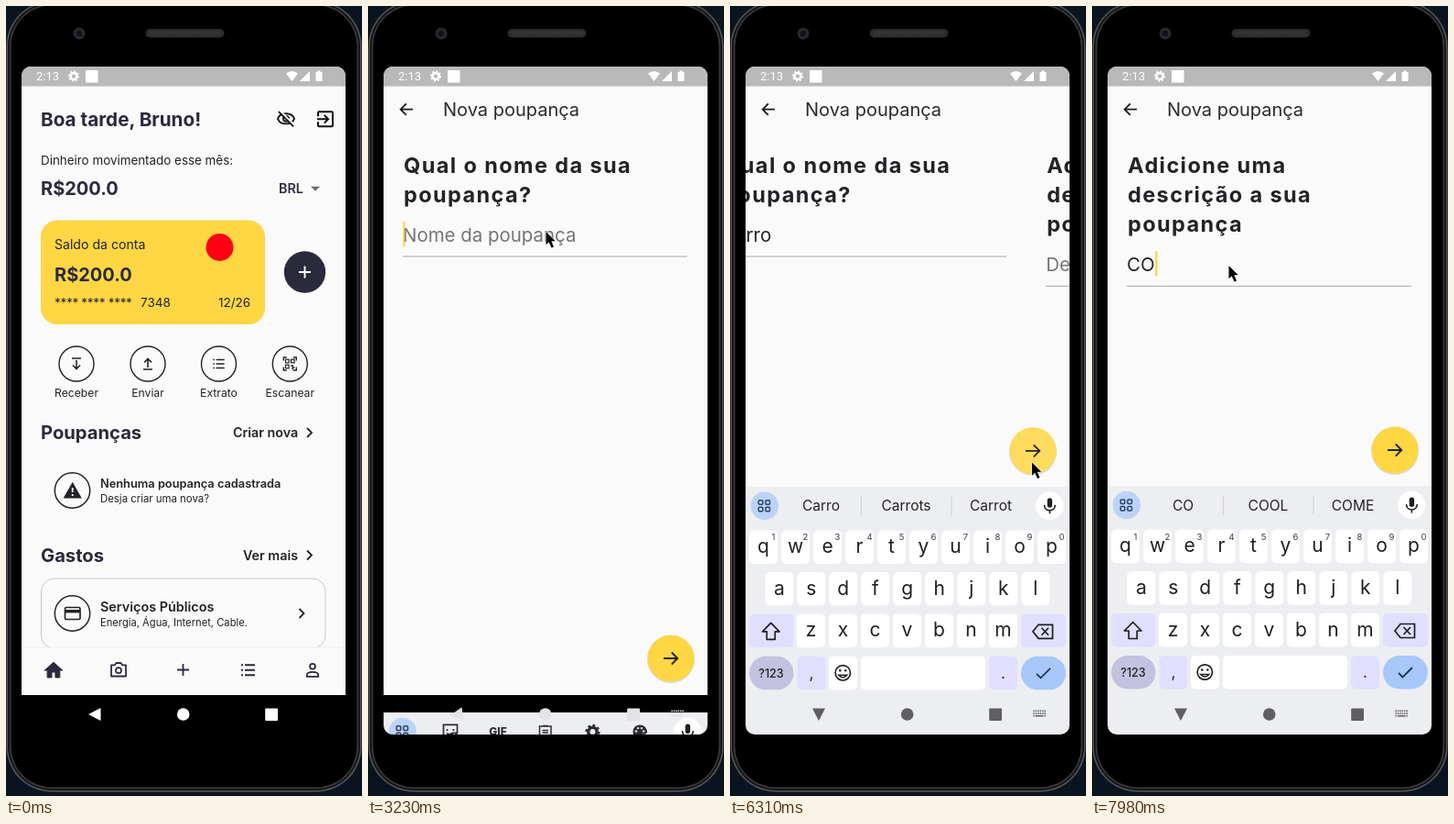
Recreate the animation shown at these times as an HTML page. Size 389 px wide and 861 px high, loop 8000 ms.

```html
<!DOCTYPE html>
<html lang="pt">
<head>
<meta charset="utf-8">
<title>Nova poupança</title>
<style>
html, body { margin: 0; width: 100%; height: 100%; overflow: hidden; background: #0a141f; }
svg { display: block; width: 100vw; height: 100vh; }
text { white-space: pre; }
</style>
</head>
<body>
<svg id="stage" viewBox="0 0 389 861" font-family="Inter, sans-serif"></svg>
<script>
const LOOP = 8000, INK = '#2a2a3c', DARK = '#222326', YELLOW = '#ffd644', PAPER = '#fafafa';
const WIDTH = 354, KB_TOP = 523, KB_HEIGHT = 271;

// ---- drawing helpers ----
const text = (x, y, s, size, weight = 400, fill = DARK, more = '') =>
  `<text x="${x}" y="${y}" font-size="${size}" font-weight="${weight}" fill="${fill}" ${more}>${s}</text>`;
const mid = (x, y, s, size, weight, fill, more = '') =>
  text(x, y, s, size, weight, fill, 'text-anchor="middle" ' + more);
const rect = (x, y, w, h, fill, r = 0, more = '') =>
  `<rect x="${x}" y="${y}" width="${w}" height="${h}" rx="${r}" fill="${fill}" ${more}/>`;
const disc = (x, y, r, fill, more = '') => `<circle cx="${x}" cy="${y}" r="${r}" fill="${fill}" ${more}/>`;
const ring = (x, y, r, color, w) => disc(x, y, r, 'none', `stroke="${color}" stroke-width="${w}"`);
const line = (d, color = DARK, w = 1.8, more = '') =>
  `<path d="${d}" fill="none" stroke="${color}" stroke-width="${w}" ${more}/>`;
const fill = (d, color = DARK) => `<path d="${d}" fill="${color}"/>`;
const at = (x, y, body, scale = 1) => `<g transform="translate(${x} ${y}) scale(${scale})">${body}</g>`;
const group = (id, body, more = '') => `<g id="${id}" ${more}>${body}</g>`;

const gear = (x, y, r, color) =>
  ring(x, y, r * .58, color, r * .42) +
  disc(x, y, r * .86, 'none', `stroke="${color}" stroke-width="${r * .3}" pathLength="16" stroke-dasharray="1 1"`);
const chevron = (x, y) => line(`M${x - 2} ${y - 5}l5 5-5 5`, DARK, 1.8);
const list = (x, y, s, color) => at(x, y,
  line('M-7.5-5.5h2M-7.5 0h2M-7.5 5.5h2M-3.5-5.5h11M-3.5 0h11M-3.5 5.5h11', color, 1.9), s);

// ---- device ----
function device() {
  const shell = (inset, color) =>
    rect(inset, inset - 6, 389 - 2 * inset, 863 - 2 * inset, color, 50 - inset);
  return rect(0, 0, 389, 861, '#0a141f') +
    shell(.5, '#56565a') + shell(2, '#161618') + shell(4, '#3b3b3e') + shell(5.5, '#000') +
    disc(80, 30, 6.5, '#29292d') + disc(80, 30, 3.2, '#10131c') +
    rect(152.5, 25, 86, 9.5, '#2b2b2d', 4.7) +
    line('M157 29.7H234', '#3c3c3f', 5, 'stroke-dasharray="1 1"');
}

function statusBar() {
  return rect(17, 66, WIDTH, 21.5, '#b9b9b9') +
    text(33, 81.3, '2:13', 13, 400, '#fff', 'font-family="Roboto, sans-serif"') +
    gear(74, 76.5, 6, '#fff') + rect(87, 70, 13.5, 13.5, '#fff') +
    fill('M306 73.6Q312.5 68.4 319 73.6L312.5 82Z', '#fff') +
    fill('M332 71V82H321Z', '#fff') +
    fill('M338.5 72h2v-1.5h3V72h2V82h-7Z', '#fff');
}

// ---- home ----
function homePage() {
  const action = (x, label, icon) =>
    ring(x, 390, 19, DARK, 1.4) + at(x, 390, icon) + mid(x, 425.5, label, 12.2);
  const corner = [0, 90, 180, 270].map(a =>
    `<g transform="rotate(${a})">${line('M-7-3.5V-7H-3.5', DARK, 1.4)}</g>`).join('');
  const scan = corner + [[-3, -3], [3, -3], [-3, 3]].map(([x, y]) =>
    rect(x - 1.8, y - 1.8, 3.6, 3.6, 'none', 0, `stroke="${DARK}" stroke-width="1.2"`)).join('') +
    line('M1 2h2v2h2M2 5.5h1.5', DARK, 1.3);
  const eye = line('M2 11.5C5 3.2 19 3.2 22 11.5C19 19.8 5 19.8 2 11.5Z', '#111', 2) +
    ring(12, 11.5, 3.4, '#111', 2) + line('M4.4 1.6L22.4 19.6', PAPER, 2.4) + line('M3 3L21 21', '#111', 2);
  return at(295.2, 112.5, eye, .9) +
    text(38, 173, 'Dinheiro movimentado esse mês:', 13.4) +
    text(38, 206, 'R$200.0', 20, 700, INK) + text(298, 204, 'BRL', 14.3, 600, INK) +
    fill('M333 196.7H343L338 201.8Z', '#6d6d70') +
    rect(38, 233.5, 245, 113.5, YELLOW, 18) +
    text(53, 265, 'Saldo da conta', 14.1) + text(53, 300, 'R$200.0', 20, 700, INK) +
    text(53, 328, '**** **** ****', 13.5, 400, DARK, 'letter-spacing="-.3"') +
    text(147, 328, '7348', 13.5) + text(232, 328, '12/26', 13.5) +
    disc(233.5, 263, 15, '#ff0015') +
    disc(326.5, 290, 22.7, INK) + line('M320 290h13M326.5 283.5v13', '#fff', 1.9) +
    action(77, 'Receber', line('M-5-6H5M0-4V5M-4 1.5L0 5.5L4 1.5', DARK, 1.6)) +
    action(155, 'Enviar', line('M-5 6H5M0 4V-5M-4-1.5L0-5.5L4-1.5', DARK, 1.6)) +
    action(232.5, 'Extrato', list(0, 0, .82, DARK)) +
    action(310.3, 'Escanear', scan) +
    text(38, 472, 'Poupanças', 20.2, 700, INK) + text(248, 470, 'Criar nova', 14.3, 600) + chevron(331, 465) +
    ring(72.5, 528, 19.2, DARK, 1.5) + fill('M72.7 518.8L82.8 536.5H62.6Z') +
    line('M72.7 525v5M72.7 532v2', PAPER, 1.8) +
    text(103, 525, 'Nenhuma poupança cadastrada', 12.8, 600) +
    text(103, 540.5, 'Desja criar uma nova?', 11.4) +
    text(38, 606, 'Gastos', 20.2, 700, INK) + text(259, 603.5, 'Ver mais', 14.3, 600) + chevron(331, 598.5) +
    rect(38.5, 624, 310.5, 76, 'none', 14, 'stroke="#c8c8ca"') +
    ring(72.5, 662, 19.2, DARK, 1.5) +
    rect(64.5, 655.5, 16.5, 13, 'none', 1.5, `stroke="${DARK}" stroke-width="1.7"`) +
    rect(64.5, 658, 16.5, 3.4, DARK) +
    text(103, 659.5, 'Serviços Públicos', 14.4, 600) +
    text(103, 675.5, 'Energia, Água, Internet, Cable.', 11.2) + chevron(322.5, 662);
}

// ---- add menu ----
function addPage() {
  const card = (y, title, a, b, icon) => rect(31, y, 326, 89.5, '#f1f2f4', 2) +
    text(120, y + 36.5, title, 19.4, 700) + text(120, y + 54, a, 11.3) + text(120, y + 69.5, b, 11.3) + icon;
  return card(159.7, 'Nova poupança', 'Crie uma nova poupança, guarda o seu', 'dinheiro e ainda ganha dinheiro.',
      line('M63.5 193V216H89M67 212L74.5 204L79.5 209L88.5 199', DARK, 2.3)) +
    card(264.2, 'Adicionar gasto', 'Tenho controle dos seus gastos através da', 'sua conta digital.',
      line('M62 321H89M65.2 297h7.6v18.5h-7.6ZM78.2 303.5h7.6v12h-7.6Z', DARK, 2.3));
}

function tabBar() {
  const lines = 'stroke-linejoin="round"';
  return rect(17, 699, WIDTH, 52, PAPER) + rect(17, 698.6, WIDTH, 1, '#efeff0') +
    group('ripple', disc(193.5, 724, 31, '#000'), 'clip-path="url(#tabs)"') +
    group('homeOn', at(40.2, 712.3, `<path d="M10 20v-6h4v6h5v-8h3L12 3 2 12h3v8z" fill="${INK}" stroke="${INK}" ${lines}/>`, .98)) +
    group('homeOff', line('M43.5 724.3L52 716.5L60.5 724.3M46 722.5V732H58V722.5M50 732v-5.5h4v5.5', INK, 1.7, lines)) +
    line('M115 718.3h3.8l1.8-2.3h4.8l1.8 2.3h3.8v12.2h-16Z', INK, 1.8, lines) + ring(123, 724.2, 3, INK, 1.7) +
    line('M187 723.5h13M193.5 717v13', INK, 1.8) + list(264.5, 723.8, 1, INK) +
    ring(335, 719.8, 2.9, INK, 1.8) + line('M328.8 730.8v-1.6c0-4.4 12.4-4.4 12.4 0v1.6Z', INK, 1.8);
}

// ---- new savings form ----
function formPage() {
  const title = lines => lines.map((s, i) =>
    text(39, 181.5 + i * 32.4, s, 23.5, 700, DARK, 'letter-spacing="1.4"')).join('');
  const field = (id, y, hint) => text(38, y, hint, 20.45, 400, '#757575', `id="${id}Hint"`) +
    text(38, y, '', 20.45, 400, DARK, `id="${id}Value"`) +
    rect(0, y - 21.5, 2, 27, '#ffcf40', 0, `id="${id}Caret"`) + rect(38, y + 16, 311, 1, '#a9a9ab');
  return rect(17, 87.5, WIDTH, 664, PAPER) +
    line('M49 112.7H36M41.8 106.5L35.6 112.7L41.8 118.9', '#1c1c1e', 1.8) +
    text(82, 120, 'Nova poupança', 20, 400, '#2b2b2d') +
    group('stepA', title(['Qual o nome da sua', 'poupança?']) + field('name', 256.5, 'Nome da poupança')) +
    group('stepB', title(['Adicione uma', 'descrição a sua', 'poupança']) + field('about', 288.8, 'Descrição da poupança')) +
    group('fab', disc(331, 1, 26, '#000', 'opacity=".13"') + disc(331, 0, 25.5, YELLOW) +
      '<circle id="fabWave" cx="331" cy="0" fill="#fff" opacity=".3"/>' +
      line('M323 0H338M331.8-6.5L338.3 0L331.8 6.5', DARK, 1.8));
}

// ---- keyboard ----
function keyboard() {
  const key = (x, y, w, color = '#fff', r = 5) => rect(x, y, w, 36.5, color, r);
  const row = (letters, x0, y) => [...letters].map((c, i) => {
    const x = x0 + i * 35;
    return key(x - 15.5, y, 31) + mid(x, y + 24.5, c, 21, 400, '#1f1f22', 'class="letter"');
  }).join('');
  const digits = [...'1234567890'].map((d, i) => mid(47.5 + i * 35, 581.5, d, 9.5, 400, '#3c3c40')).join('');
  const ink = '#2c2c30';
  const tools = line('M82.5 536.5h15v9l-5 5h-10ZM97.5 545.5h-5v5M86.5 541v2M93.5 541v2M86 545.5q3 2.5 6 0', ink, 1.7) +
    mid(142, 548, 'GIF', 12, 800, ink) +
    line('M187.5 538h12.5v13h-12.5ZM191 537.6h5.6M190.5 542.5h6.5M190.5 545.2h6.5M190.5 548h4.5', ink, 1.5) +
    gear(245.5, 544, 8, ink) +
    fill('M297 536.5a7.5 7.5 0 1 0 0 15c2 0 2-1.5 1.4-2.4c-.6-1.4.3-2.3 1.6-2.3h2c6 0 2.5-10.3-5-10.3Z', ink) +
    [[293, 543.5], [295, 540.2], [299, 540.2], [301.2, 543.5]].map(([x, y]) => disc(x, y, 1.2, '#edeef1')).join('');
  const words = [99.5, 192.5, 285].map(x => mid(x, 549.5, '', 15.5, 400, '#232326', 'class="word"')).join('') +
    rect(143, 533.5, 1, 21, '#cfcfd4') + rect(241.5, 533.5, 1, 21, '#cfcfd4');
  const grid = [[32, 538.5], [39.7, 538.5], [32, 546], [39.7, 546]].map(([x, y]) =>
    rect(x - .8, y - .6, 4.6, 4.6, 'none', 1, 'stroke="#2b4468" stroke-width="1.5"')).join('');
  return rect(17, KB_TOP, WIDTH, KB_HEIGHT, '#edeef1') +
    disc(37.8, 544, 15.2, '#bcd3f8') + grid +
    group('tools', tools) + group('words', words) +
    disc(349.3, 544, 15.2, '#fff') + rect(346.7, 535.5, 5.4, 10.5, '#1f1f22', 2.7) +
    line('M343.5 543c0 8 11.8 8 11.8 0M349.4 549v3.5', '#1f1f22', 1.6) +
    row('qwertyuiop', 36.5, 570.8) + digits + row('asdfghjkl', 53.8, 616.3) +
    key(21, 662, 48.5, '#e0dfff') +
    `<path id="shift" d="M44.7 671.5L54 681h-4.8v8.5h-9V681h-4.8Z" stroke="#1f1f22" stroke-width="1.7" stroke-linejoin="round"/>` +
    row('zxcvbnm', 88.5, 662) +
    key(318, 662, 49, '#e0dfff') +
    line('M331 681l6-7.5h15.5v15h-15.500ZM340.500 677l7.500 8M348 677l-7.500 8', '#1f1f22', 1.7) +
    key(21, 708, 48.5, '#c3c2e0', 18.2) + mid(45, 731, '?123', 12.5, 500, '#1f1f22') +
    key(73.5, 708, 31, '#e0dfff') + mid(89, 732, ',', 17) +
    key(108, 708, 31) + ring(123.3, 726, 8.2, '#1f1f22', 1.7) + line('M118.800 728.500q4.500 5 9 0Z', '#1f1f22', 1.600) +
    disc(120.3, 723.5, 1.3, '#1f1f22') + disc(126.3, 723.5, 1.3, '#1f1f22') +
    key(143, 708, 136) + key(283, 708, 31, '#e0dfff') + mid(298.5, 732, '.', 17) +
    key(318, 708, 49, '#a8c7fa', 18.2) + line('M335 727l4.500 4.500L350 721', '#1d3557', 1.800);
}

function navIcons() {
  let dots = '';
  for (let r = 0; r < 3; r++) for (let c = 0; c < 6; c++)
    if (r < 2 || c < 1 || c > 4) dots += rect(331.4 + c * 2.4, 767.5 + r * 2.7, 1.5, 1.6, 'inherit');
  dots = dots.replace(/fill="inherit"/g, '') + '<rect x="333.8" y="772.9" width="8.700" height="1.600"/>';
  return group('nav', `<path id="back" d="M-7 0L6.500-7V7Z"/>
    <circle cx="193.700" cy="772" r="6.800"/><rect x="283.200" y="765.500" width="13.800" height="13.500" rx="1"/>` +
    group('imeIcon', dots));
}

const pointer = '<path d="M0 0V14.200L3.200 11.200L6 17.500L8.500 16.400L5.800 10.200H10.200Z" fill="#000" stroke="#fff" stroke-width="1" paint-order="stroke"/>';

document.getElementById('stage').innerHTML =
  `<defs><clipPath id="screen"><rect x="17" y="66" width="${WIDTH}" height="728" rx="10"/></clipPath>
   <clipPath id="tabs"><rect x="17" y="699" width="${WIDTH}" height="52"/></clipPath></defs>` + device() +
  `<g clip-path="url(#screen)">` +
    rect(17, 66, WIDTH, 685, PAPER) +
    text(38, 131, 'Boa tarde, Bruno!', 20.7, 700, INK) +
    at(337, 111.3, fill('M10.090 15.590L11.500 17l5-5-5-5-1.410 1.410L12.670 11H3v2h9.670zM19 3H5a2 2 0 0 0-2 2v4h2V5h14v14H5v-4H3v4a2 2 0 0 0 2 2h14a2 2 0 0 0 2-2V5a2 2 0 0 0-2-2z', '#111')) +
    group('home', homePage()) + group('add', addPage()) + tabBar() +
    group('form', formPage()) + statusBar() +
    rect(17, 751, WIDTH, 43, '#000') +
    group('keyboard', keyboard()) + navIcons() +
  '</g>' + group('pointer', pointer);

// ---- timing ----
const el = {};
document.querySelectorAll('[id]').forEach(n => el[n.id] = n);
const letters = [...document.querySelectorAll('.letter')], words = [...document.querySelectorAll('.word')];
const lower = letters.map(n => n.textContent);

const clamp = v => Math.max(0, Math.min(1, v));
const ramp = (t, a, b) => clamp((t - a) / (b - a));
const easeOut = p => 1 - (1 - p) ** 3;
const easeInOut = p => (1 - Math.cos(Math.PI * p)) / 2;
const within = (t, spans) => spans.some(([a, b]) => t >= a && t < b);
const last = (t, steps) => steps.reduce((v, [time, value]) => t >= time ? value : v, null);
const show = (node, on) => node.setAttribute('display', on ? 'inline' : 'none');
const move = (node, x, y, more = '') => node.setAttribute('transform', `translate(${x} ${y}) ${more}`);
const fade = (node, v) => node.setAttribute('opacity', v);

const track = [[70, 312, 850], [480, 194, 728], [1150, 194, 728], [1640, 175, 229], [2130, 175, 229],
  [2330, 189, 244], [2400, 191, 244], [2730, 191, 244], [2800, 194.5, 246], [5470, 194.5, 246],
  [5950, 332, 500], [6280, 332, 500], [6740, 149.5, 283]];
const nameTyped = [[0, ''], [4120, 'C'], [4460, 'Ca'], [4530, 'Carr'], [4660, 'Carro']];
const aboutTyped = [[0, ''], [7560, 'C'], [7910, 'CO']];
const guesses = [[0, ''], [4190, 'C Can Could'], [4460, 'Ca Can Car'], [4530, 'Carr Carry Carried'],
  [4930, 'Carro Carrots Carrot'], [6620, ''], [7570, 'C CAN COM'], [7980, 'CO COOL COME']];
const nameCaret = [[2800, 3300], [4120, 5200], [5600, 6100]];
const aboutCaret = [[6780, 7200], [7560, 8000]];

function pointerAt(t) {
  for (let i = 1; i < track.length; i++) {
    const [t0, x0, y0] = track[i - 1], [t1, x1, y1] = track[i];
    if (t < t1) {
      const p = easeInOut(ramp(t, t0, t1));
      return [x0 + (x1 - x0) * p, y0 + (y1 - y0) * p];
    }
  }
  return track[track.length - 1].slice(1);
}

function drawField(id, value, caretOn) {
  el[id + 'Value'].textContent = value;
  show(el[id + 'Hint'], !value);
  show(el[id + 'Caret'], caretOn);
  el[id + 'Caret'].setAttribute('x', value ? 38.7 + el[id + 'Value'].getComputedTextLength() : 38.3);
}

function render(t) {
  fade(el.home, 1 - ramp(t, 820, 940));
  const enter = 1 - (1 - ramp(t, 945, 1245)) ** 2;
  fade(el.add, enter);
  move(el.add, 18 * (1 - enter), 0);
  show(el.homeOn, t < 880);
  show(el.homeOff, t >= 880);
  fade(el.ripple, .045 * ramp(t, 740, 840) * (1 - ramp(t, 1200, 1450)));
  el.ripple.firstChild.setAttribute('r', 31 * easeOut(ramp(t, 730, 960)));

  show(el.form, t >= 1884);
  move(el.form, WIDTH * (1 - easeOut(ramp(t, 1884, 2334))), 0);
  const turn = easeInOut(ramp(t, 6215, 6620));
  move(el.stepA, -WIDTH * turn, 0);
  move(el.stepB, WIDTH * (1 - turn), 0);
  show(el.stepA, turn < 1);
  show(el.stepB, turn > 0);
  drawField('name', last(t, nameTyped), within(t, nameCaret));
  drawField('about', last(t, aboutTyped), within(t, aboutCaret));

  const rise = t < 6300 ? easeOut(ramp(t, 3220, 3580))
    : t < 6900 ? 1 - easeInOut(ramp(t, 6300, 6620)) : easeOut(ramp(t, 7000, 7360));
  const drop = KB_HEIGHT * (1 - rise);
  show(el.keyboard, rise > 0);
  move(el.keyboard, 0, drop);
  move(el.fab, 0, Math.min(711, KB_TOP + drop - 39));
  const wave = ramp(t, 6030, 6230);
  el.fabWave.setAttribute('r', 25.5 * easeOut(wave));
  fade(el.fabWave, .3 * (1 - ramp(t, 6200, 6400)));

  const caps = within(t, [[4050, 4260], [7430, 7570]]);
  letters.forEach((n, i) => n.textContent = caps ? lower[i].toUpperCase() : lower[i]);
  el.shift.setAttribute('fill', caps ? '#1f1f22' : 'none');
  const guess = last(t, guesses);
  show(el.tools, !guess);
  show(el.words, guess);
  if (guess) guess.split(' ').forEach((w, i) => words[i].textContent = w);

  const tone = Math.round(255 - 160 * clamp(rise * 2));
  el.nav.setAttribute('fill', `rgb(${tone},${tone},${tone + (rise > 0 ? 2 : 0)})`);
  move(el.back, 97, 772, `rotate(${-90 * rise})`);
  show(el.imeIcon, t >= 3230);

  show(el.pointer, t >= 70);
  move(el.pointer, ...pointerAt(t));
}

const start = performance.now();
function tick() {
  render((performance.now() - start) % LOOP);
  requestAnimationFrame(tick);
}
tick();
</script>
</body>
</html>
```
